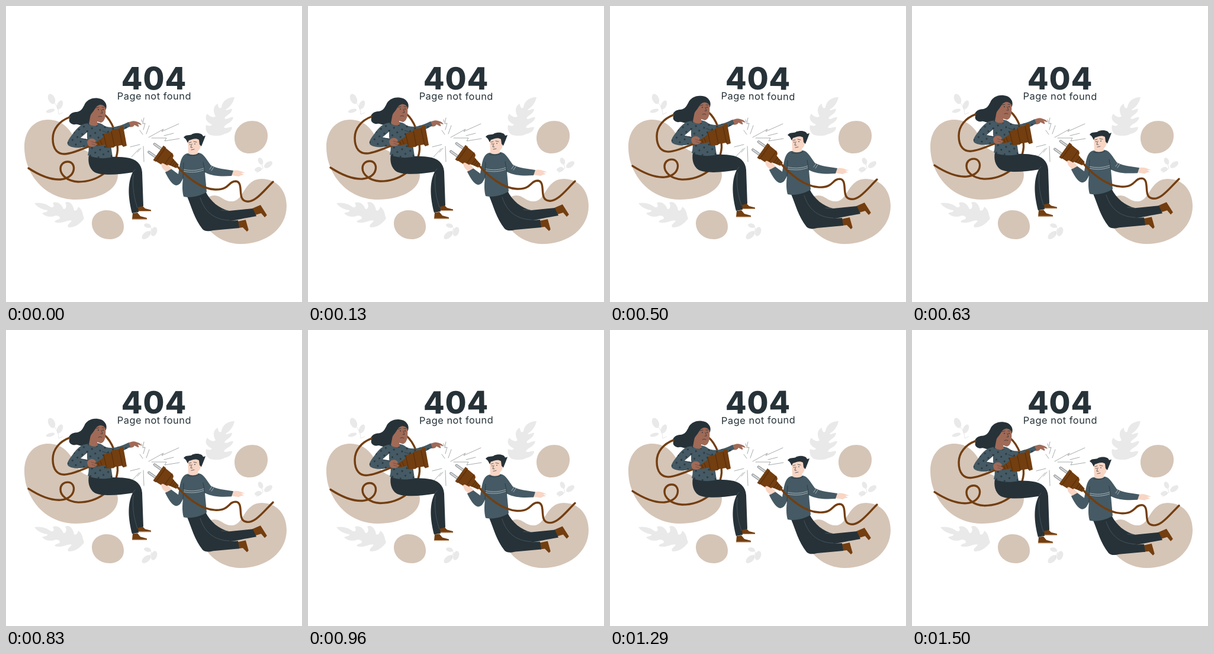
An HTML page for the animation above (1.54 s loop, 500 by 500 pixels).

```html
<!DOCTYPE html>
<html lang="en">
<head>
<meta charset="utf-8">
<title>Page not found</title>
<style>
  html, body { margin: 0; width: 100%; height: 100%; overflow: hidden; background: #fff; }
  svg { display: block; width: 100vw; height: 100vh; }
  text { font-family: Inter, sans-serif; text-anchor: middle; fill: #263238; }
  .blob { fill: #d5c5b7; }
  .leaf { fill: #e9e9e9; }
  .dark { fill: #263238; }
  .knit { fill: #455a64; }
  .brown { fill: #733e10; }
  .tan { fill: #a06a57; }
  .pale { fill: #f8d5c4; }
  .cord, .line { fill: none; stroke-linecap: round; stroke-linejoin: round; }
  .cord { stroke: #733e10; stroke-width: 3.4; }
  .line { stroke: #263238; stroke-width: .7; }
  .light { stroke: #d3dade; }
  .seam { stroke: #65737a; stroke-width: .5; }
  .groove { stroke: #45240a; }
  .sole { stroke: #e3c5a8; }
  .spark { stroke: #6b7276; stroke-width: .6; }
</style>
</head>
<body>
<svg viewBox="0 0 500 500">
  <defs>
    <pattern id="dots" width="14" height="13" patternUnits="userSpaceOnUse" patternTransform="rotate(12)">
      <rect class="knit" width="14" height="13"/>
      <circle class="dark" cx="3" cy="3" r="1.4"/>
      <circle class="dark" cx="10" cy="9.5" r="1.4"/>
    </pattern>
  </defs>

  <g class="blob">
    <path d="M31 238C31 210 48 192 71 192C99 192 110 212 122 234C133 254 189 250 189 285C189 312 155 327 118 327C66 327 31 284 31 238Z"/>
    <path d="M432 292C458 292 474 312 474 338C474 375 440 402 396 402C362 402 332 376 331 350C330 332 340 320 352 320C364 320 368 331 383 330C402 328 402 292 432 292Z"/>
    <path d="M386 225C385 207 399 194 416 194C432 194 442 205 442 219C442 236 429 249 411 249C396 249 387 239 386 225Z"/>
    <path d="M145 367C145 353 157 345 170 345C187 345 199 357 199 373C199 387 187 394 175 394C158 394 145 382 145 367Z"/>
  </g>

  <g class="leaf">
    <path d="M48 333C58 331 69 334 76 340C81 341 82 337 79 333C85 329 94 334 97 343C102 344 103 337 100 332C108 328 114 337 115 345C119 347 121 343 122 339C130 344 129 352 132 359C125 368 117 374 106 374C101 371 108 367 111 363C107 360 96 367 88 366C79 366 82 362 90 360C93 357 89 354 84 354C75 358 65 355 61 350C64 348 71 349 70 345C61 344 53 340 48 333Z"/>
    <path d="M386 154C374 154 365 161 364 171C361 175 358 171 358 165C350 168 349 178 354 186C351 190 343 186 340 182C334 190 340 197 348 200C346 204 341 202 338 201C336 208 339 215 345 218C354 220 363 220 369 216C376 215 382 210 382 205C378 203 372 208 368 205C370 199 382 198 384 188C379 186 373 193 369 190C371 184 381 183 382 174C379 173 373 178 371 175C378 171 384 164 386 154Z"/>
    <g id="sprigs"></g>
  </g>

  <g id="title">
    <text x="250" y="141" font-size="52" font-weight="800" letter-spacing=".9">404</text>
    <text x="250.4" y="158.3" font-size="16.4" letter-spacing=".5">Page not found</text>
  </g>

  <path class="line spark" d="M233 189L231 199L235 198L232 209M229 192L230 196M242 202L237 216M226 210L231 217M292 199L263 212L266 208L241 222M293 224L268 228L271 223L246 223M267 219L283 215M232 237L233 263M210 238L226 234M212 255L225 241M222 247L228 240"/>

  <g class="float">
    <path class="cord" d="M107 188C126 176 152 174 166 183C179 194 189 218 188.500 243C186 277 153 297 122 297C103 296 92 285 92 275C92 268 97 263 104 263C112 263 116 270 114 278C112 286 104 292 92 293C73 294 55 285 38 274"/>
    <path class="dark" d="M132 168C135 159 146 154 156 156C166 157 172 166 169 174L154 194C146 203 138 197 133 200C128 205 121 198 117 200C111 201 105 196 107 191C104 184 112 179 119 179C127 178 129 173 132 168Z"/>
    <path class="brown" d="M222 338L230 337L235 342L245 344.500V347H221ZM214 350L222 349L227 355L238 358V360.500H213Z"/>
    <path class="line sole" d="M221 346.500H245M213 360H238"/>
    <path class="dark" d="M140 252C160 257 182 253 203 256C220 258 229 267 230 281L232 338L223 340L224 348L213 350C207 327 204 301 214 281C190 285 163 287 150 281C140 275 138 262 140 252Z"/>
    <path class="line seam" d="M214 281L218 276M215 285C213 309 217 326 222 341"/>
    <path class="tan" d="M205 197C211 195 215 193 220 195C224 196 228 198 229 201L222 199C225 202 225 204 223 204L217 201C215 205 211 205 207 204Z"/>
    <path fill="url(#dots)" d="M137 199C145 195 157 196 163 200C174 209 190 204 207 196L210 203C199 210 187 215 174 215L180 255C165 259 150 257 138 252C142 240 138 232 137 222Z"/>
    <path fill="url(#dots)" d="M139 198C126 199 120 206 112 217C105 226 101 232 106 236C114 241 130 240 140 236L138 225L125 223L139 211Z"/>
    <path class="line" d="M139 211L125 223L139 226M163 211L174 215"/>
    <path class="tan" d="M146 170C154 163 165 163 168 171C169 183 168 196 160 197L154 195L155 201C149 204 143 202 140 199L143 183Z"/>
    <path class="dark" d="M139 172C144 159 162 156 169 166L169 173C166 168 162 166 158 167C151 169 150 176 145 181L141 187Z"/>
    <path class="line" d="M152 172L157 171M162 171L166 171M161 175L163 181L160 181M156 187Q159 185 162 187"/>
    <circle class="dark" cx="156" cy="175" r=".9"/><circle class="dark" cx="164" cy="175" r=".9"/>
    <path class="cord" d="M156 232C139 236 122 246 106 249C86 254 79 240 79 224C79 207 91 194 107 188"/>
    <path class="brown" d="M151 231L164 222L165 216L177 213L179 209L191 207L192 204L198 203L204 236L198 238L196 235L184 237L182 239L170 240L167 234L154 237Z"/>
    <path class="line groove" d="M165 217L170 239M178 212L183 237M191 208L197 236M155 230L157 235M159 227L162 234"/>
    <path class="tan" d="M139 226C144 222 150 224 152 228L150 231L154 233C153 237 146 239 140 237C137 233 136 229 139 226Z"/>
    <path class="line" style="stroke:#6f4236" d="M144 229L150 231M145 233L151 235"/>
  </g>

  <g class="float">
    <path class="brown" d="M416 342L430 336L441 353L437 357L431 350L421 353ZM391 364L405 361L410 378L407 381L400 374L392 375Z"/>
    <path class="line sole" d="M430.500 336L441 353M405.500 361L410 378"/>
    <path class="dark" d="M337 313C345 330 360 342 377 346L417 342L423 355C403 358 390 362 377 363L392 362L394 375L350 379C342 381 336 381 332 377C318 359 314 341 306 322Z"/>
    <path class="line seam" d="M328 324C335 346 350 361 377 362M376 346L364 345"/>
    <path class="pale" d="M382 279C389 276 395 278 404 282L397 282L402 285L397 286L393 288L381 286Z"/>
    <path class="knit" d="M306 249L326 248C335 250 339 260 346 269C357 275 371 276 384 278L381 287C366 288 349 288 336 281L339 314C328 321 312 325 300 322C297 311 298 300 299 291C296 298 293 303 287 303C280 302 273 289 269 281L276 273L291 284C294 270 294 252 306 249Z"/>
    <path class="line light" d="M300 276C312 279 324 278 334 274M300 279C312 282 324 281 334 277M348 270L344 276M351 272L347 278"/>
    <path class="line" d="M300 265L299 291M333 264L336 281M307 252Q318 254 326 250"/>
    <path class="pale" d="M307 224L328 222C331 233 329 242 324 245V249C319 252 312 252 308 249Z"/>
    <path class="dark" d="M300 222C304 216 311 220 315 216C325 213 332 216 333 220L337 219L334 227L330 237L327 234L326 226C320 222 314 226 309 227L307 231C305 228 305 225 300 222Z"/>
    <path class="line" d="M309 231L313 230M317 229L322 230M314 233L312 239L315 239M313 243L318 242"/>
    <circle class="dark" cx="311" cy="234" r=".8"/><circle class="dark" cx="319" cy="233" r=".8"/>
    <path class="pale" d="M264 265L274 269L280 275L271 280C266 277 260 271 264 265Z"/>
    <path class="cord" d="M286 267C305 290 330 309 353 310C378 311 375 296 388 296C402 297 391 324 403 329C419 336 436 311 451 297"/>
    <g transform="translate(258 248.500) rotate(35.500)">
      <path fill="#d5d5d5" stroke="#59656a" stroke-width=".7" d="M1 -10H-15Q-18 -8 -15 -6.500H1ZM1 6.500H-15Q-18 8 -15 10H1Z"/>
      <path class="brown" d="M-1 -15H4V-14L19 -13Q24 -12 24 -7L27 -6L39 -3.500V3.500L27 6L24 7Q24 12 19 13L4 14V15H-1Z"/>
      <path class="line groove" d="M4 -14V14M19 -13V13M27 -6V6M31 -4V4M35 -3V3"/>
    </g>
    <path class="pale" d="M262 267Q264 264 268 267L275 271Q277 274 273 275L264 272Z"/>
  </g>
</svg>
<script>
  const LOOP = 1540, STEPS = 37, LIFT = 6;
  const title = document.getElementById("title");
  const floats = document.querySelectorAll(".float");

  // Each leaflet: centre x, centre y, long radius, short radius, angle
  const leaflets = [
    [77, 157, 9, 5.5, 65], [91, 167, 8, 4.5, -65], [75, 177, 7.5, 3, -15],
    [430, 262, 6, 4, 65], [443, 268, 8, 4.5, -35], [426, 276, 6, 4, -15],
    [239, 371, 6, 3.5, 15], [250, 381, 8, 5, -70], [237, 387, 9, 5, -40]
  ];
  const stems = "M82 164Q89 172 89 183L96 180M432 267L434 274L423 282M243 372L246 376L241 386";
  document.getElementById("sprigs").innerHTML =
    leaflets.map(([x, y, rx, ry, a]) =>
      `<ellipse rx="${rx}" ry="${ry}" transform="translate(${x} ${y}) rotate(${a})"/>`).join("") +
    `<path d="${stems}" fill="none" stroke="#e0e0e0" stroke-width=".8"/>`;

  // Triangle wave: 0 at phase 0, 1 at phase 0.5
  const triangle = p => 1 - Math.abs(1 - 2 * (p % 1));

  function draw() {
    const phase = Math.floor(performance.now() % LOOP / LOOP * STEPS) / STEPS;
    const tilt = 2 * triangle(phase + 0.25) - 1;
    title.setAttribute("transform", `rotate(${tilt} 250 132)`);
    for (const g of floats) g.setAttribute("transform", `translate(0 ${-LIFT * triangle(phase)})`);
    requestAnimationFrame(draw);
  }
  draw();
</script>
</body>
</html>
```
